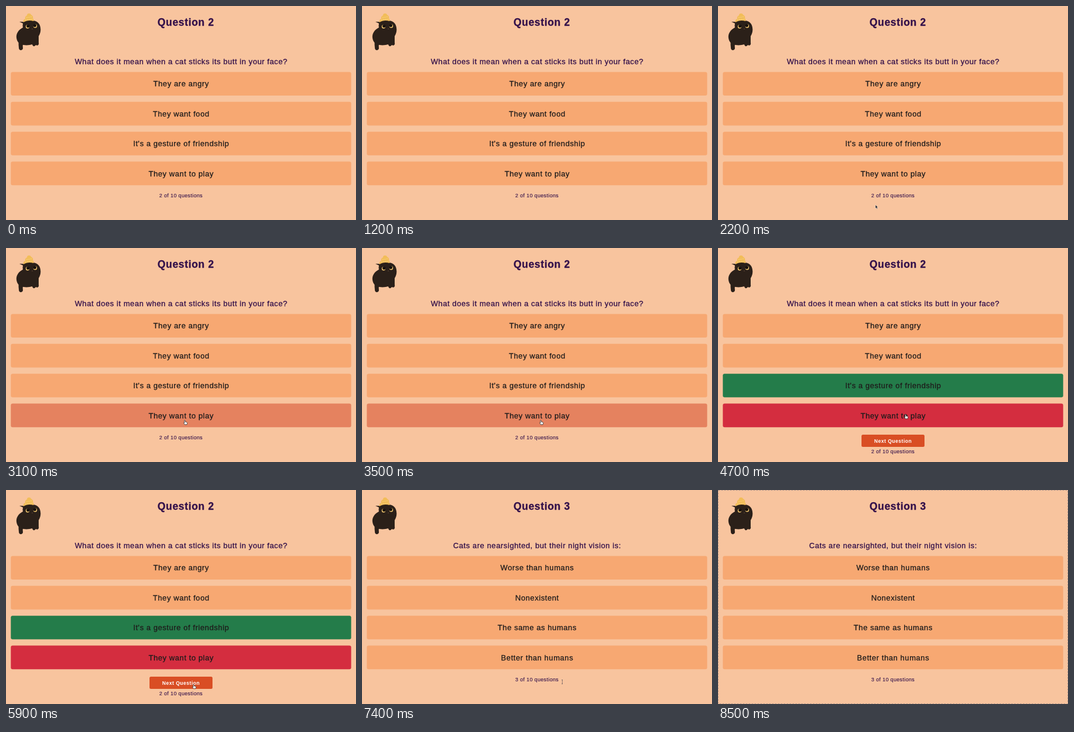
An HTML page for the animation above (8.6 s loop, 600 px wide and 368 px high).

```html
<!DOCTYPE html>
<html lang="en">
<head>
<meta charset="utf-8">
<title>Cat quiz</title>
<style>
html, body { margin: 0; width: 100%; height: 100%; overflow: hidden; background: #f8c49e; }
svg { display: block; width: 600px; height: 368px; }
text {
  font-family: "Liberation Sans", Arial, sans-serif;
  font-size: 13px; letter-spacing: .58px; text-anchor: middle;
  fill: #1f1c1c; stroke: #1f1c1c; stroke-width: .3px; stroke-linejoin: round;
}
.ink { fill: #33104a; stroke: #33104a; }
#title { font-size: 17.5px; font-weight: bold; letter-spacing: .65px; }
#count { font-size: 9px; letter-spacing: .34px; stroke-width: .1px; }
#next text { font-size: 8.6px; font-weight: bold; letter-spacing: .48px; fill: #fff; stroke: none; }
</style>
</head>
<body>
<svg viewBox="0 0 600 368">
  <rect width="600" height="368" fill="#f8c49e"/>
  <g id="cat" fill="#2b2019">
    <path d="M22 60C21 66 22 69 22 72C22 77 28 77 29 73C29 69 28 68 30 64Z"/>
    <path d="M29 37C21 41 17 48 18 55C19 62 23 66 30 67C36 68 41 67 45 66C46 70 49 70 51 67C54 69 57 67 56 63L56 52C59 47 60 42 59 37C58 29 52 25 45 25H33C29 28 28 32 29 37Z"/>
    <path d="M31 31L23 27L33 27.5Z"/>
    <g fill="#efc46d"><circle cx="37" cy="35.5" r="3.2"/><circle cx="50" cy="34.5" r="3.2"/></g>
    <g fill="#16100d"><circle cx="37.8" cy="34.6" r="2.7"/><circle cx="49.3" cy="33.6" r="2.7"/></g>
    <path d="M44 39L46 39L45 40Z" fill="#8a6650"/>
    <path d="M30 28C29 25 30 23 33 22C32 18 35 17 36 16C36 12 42 12 43 15C46 17 47 19 46 21C48 23 48 25 47 26C41 24 35 25 30 28Z" fill="#f2bd59"/>
    <path d="M33 24L46 22.5M35 20L44 18.5" stroke="#f8d487" stroke-width="1" stroke-dasharray="2 1.5"/>
  </g>
  <text id="title" class="ink" x="308.3" y="34"></text>
  <text id="ask" class="ink" x="300.3" y="99.6"></text>
  <g id="options"></g>
  <g id="next">
    <rect x="246" y="321" width="108" height="21" rx="2.5" fill="#d94e24"/>
    <text x="300" y="335">Next Question</text>
  </g>
  <text id="count" class="ink" x="300"></text>
  <rect id="edge" x=".5" y=".5" width="599" height="367" fill="none" stroke="#b5998c" stroke-dasharray="3 2"/>
  <g id="cursor">
    <path d="M0-3V3L1.4 1.9L2.5 4L3.4 3.5L2.4 1.5L4 1.3Z" fill="#1c1c24" stroke="#fff" stroke-width=".4"/>
    <path d="M-1.2-3.4Q-.4-4.2.2-3.2L.6-1L3.1-.4Q4 0 3.7 1.2L3 3.7H-.5L-2.5 .8Q-2.2-.2-1 .7Z" fill="#fff" stroke="#333" stroke-width=".8"/>
    <path d="M-.6-2.4H1.4M.4-2.2V4.2M-.6 4.4H1.4" fill="none" stroke="#4a4250" stroke-width=".8" stroke-dasharray="1.6 .7"/>
  </g>
</svg>
<script>
const LOOP = 8600, STEP = 100, ANSWER = 4700, ADVANCE = 7000, BLUR = 7500;
const TOP = 113.4, PITCH = 51.4, HEIGHT = 40.6;
const BASE = "#f7a872", HOVER = "#e5825f", RIGHT = "#247c4a", WRONG = "#d42d3f";
const quiz = [
  { n: 2, ask: "What does it mean when a cat sticks its butt in your face?",
    options: ["They are angry", "They want food", "It's a gesture of friendship", "They want to play"] },
  { n: 3, ask: "Cats are nearsighted, but their night vision is:",
    options: ["Worse than humans", "Nonexistent", "The same as humans", "Better than humans"] }
];
// Pointer stops: time, x, y
const path = [
  [1800, 250, 362], [2200, 270, 345], [2600, 290, 330], [2900, 307, 300],
  [3600, 307, 300], [3800, 312, 240], [4000, 318, 238], [4300, 322, 265],
  [4600, 322, 290], [5000, 322, 290], [5500, 322, 338], [7000, 322, 338],
  [7400, 343, 329], [7700, 356, 352]
];

const $ = id => document.getElementById(id);
const show = (el, on) => el.setAttribute("visibility", on ? "visible" : "hidden");

$("options").innerHTML = quiz[0].options.map((_, i) => {
  const y = TOP + i * PITCH;
  return `<rect x="8.3" y="${y}" width="583.4" height="${HEIGHT}" rx="3"/><text x="300.3" y="${y + 25}"></text>`;
}).join("");
const boxes = $("options").querySelectorAll("rect");
const labels = $("options").querySelectorAll("text");

function pointer(t) {
  const i = path.findIndex(p => p[0] > t);
  if (i < 1) return null;
  const [a, b] = [path[i - 1], path[i]];
  const k = (t - a[0]) / (b[0] - a[0]);
  return { x: a[1] + (b[1] - a[1]) * k, y: a[2] + (b[2] - a[2]) * k };
}

function optionColor(i, answered, tipY) {
  if (answered) return [BASE, BASE, RIGHT, WRONG][i];
  const dy = tipY - TOP - i * PITCH;
  return dy >= 0 && dy <= HEIGHT ? HOVER : BASE;
}

function draw(now) {
  const t = Math.floor(now % LOOP / STEP) * STEP;
  const page = quiz[t < ADVANCE ? 0 : 1];
  const answered = t >= ANSWER && t < ADVANCE;
  const at = pointer(t);

  $("title").textContent = "Question " + page.n;
  $("ask").textContent = page.ask;
  $("count").textContent = page.n + " of 10 questions";
  $("count").setAttribute("y", answered ? 352.5 : 329);
  page.options.forEach((label, i) => {
    labels[i].textContent = label;
    boxes[i].setAttribute("fill", optionColor(i, answered, at ? at.y - 3 : 0));
  });
  show($("next"), answered);
  show($("edge"), t >= BLUR);

  // Arrow, hand or text beam
  const kind = t < 2800 ? 0 : t < ADVANCE ? 1 : 2;
  [...$("cursor").children].forEach((el, i) => show(el, at && i === kind));
  if (at) $("cursor").setAttribute("transform", `translate(${at.x} ${at.y})`);
}

const start = performance.now();
function tick() {
  draw(performance.now() - start);
  requestAnimationFrame(tick);
}
tick();
</script>
</body>
</html>
```
